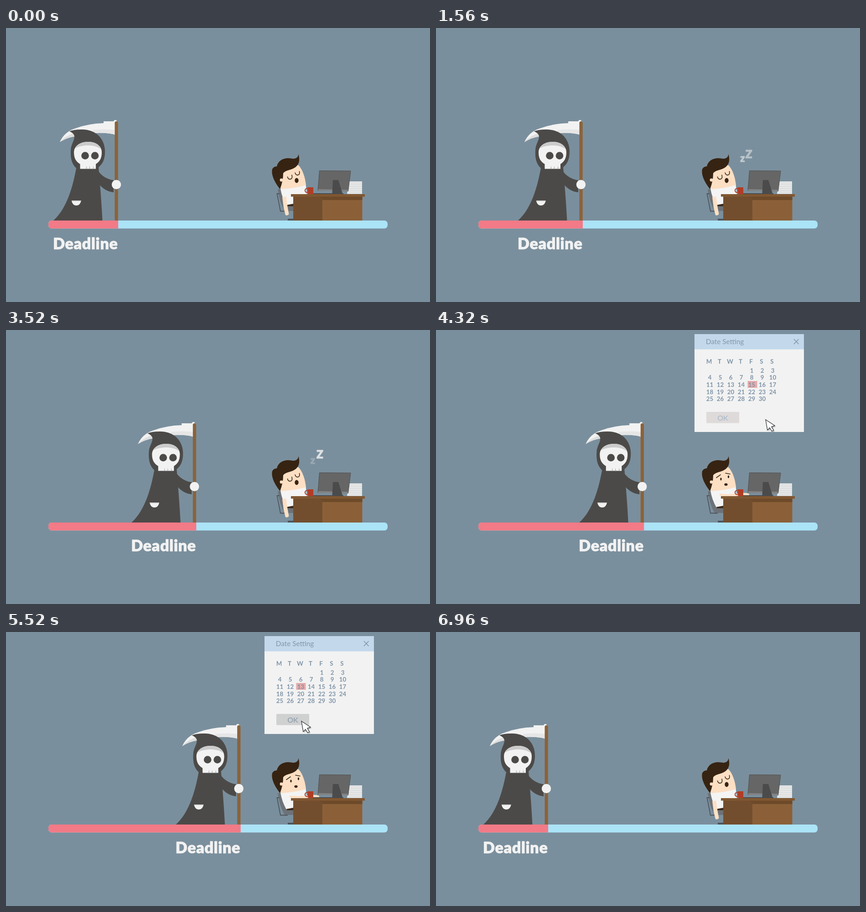
An HTML page that plays this animation: 930x602 px, repeating every 7000 ms.

```html
<!DOCTYPE html>
<html lang="en">
<head>
<meta charset="utf-8">
<title>Deadline</title>
<style>
html, body { margin: 0; width: 100%; height: 100%; overflow: hidden; background: #7a8f9d; }
svg { display: block; width: 930px; height: 602px; }
text { font-family: Lato, "Open Sans", sans-serif; text-anchor: middle; }
.line { fill: none; stroke: #3a2716; stroke-width: 1.6; stroke-linecap: round; }
.bold { font-weight: 900; fill: #f2f2f2; stroke: #f2f2f2; stroke-width: .9; stroke-linejoin: round; }
</style>
</head>
<body>
<svg viewBox="0 0 930 602">
  <rect width="930" height="602" fill="#7a8f9d"/>
  <clipPath id="track"><rect x="93" y="423" width="744" height="17.5" rx="7"/></clipPath>
  <g clip-path="url(#track)">
    <rect x="93" y="423" width="744" height="18" fill="#abe3f7"/>
    <rect id="red" x="93" y="423" width="153" height="18" fill="#f37a87"/>
  </g>

  <g id="reaper">
    <path fill="#f2f2f2" d="M118 250.500Q128 228 152 220.500Q180 210 214 209V205H236Q237 202 240 202T243 206V235Q225 229 190 231L150 238Q134 240 118 250.500Z"/>
    <path fill="#dedede" d="M118 250.500Q131 236 150 231V238.500Q134 241 118 250.500Z"/>
    <path fill="#e6e6e6" d="M190 224Q215 221 240 224V235Q225 229 190 231Z"/>
    <path fill="#4c4a48" d="M139 227Q150 222.500 168 223C200 224 217 245 217 272C217 290 211 299 203 306C206 340 210 390 211.500 423H104C135 395 147 345 154 308C146 300 141 290 142 270C142 255 150 249 150 238Q149 231 139 227Z"/>
    <path fill="#4c4a48" d="M202 314Q214 331 236 334.500V361Q217 359 204 343Z"/>
    <path fill="#f2f2f2" d="M149 273C149 259 163 250 180 250S210 259 210 273C210 286 206 293 197 299V309.500H162.500V299C153 293 149 286 149 273Z"/>
    <path fill="#cbcbcb" d="M151 265C156 255 166 250 180 250S204 255 208.500 266C200 260 190 258 180 258S158 260 151 265Z"/>
    <circle cx="173.500" cy="280.500" r="8.300" fill="#4c4a48"/>
    <circle cx="195" cy="280.500" r="8.300" fill="#4c4a48"/>
    <path fill="#bdbdbd" d="M175 309.500L176.500 303 178 309.500ZM182 309.500L183.500 303 185 309.500ZM190 309.500L191.500 303 193 309.500Z"/>
    <path fill="#f2f2f2" d="M144 379H164.500A10.250 11 0 0 1 144 379Z"/>
    <path fill="#d5d5d5" d="M144 379H164.500V381H144Z"/>
    <path fill="#8c6239" d="M238.500 423V208.500Q238.500 205 242 205T245.700 208.500V423Z"/>
    <circle cx="242" cy="344" r="10.200" fill="#f2f2f2"/>
    <text class="bold" x="174.300" y="486" font-size="34" letter-spacing=".7">Deadline</text>
  </g>

  <g id="worker">
    <path fill="#6d7278" d="M596 354H603L617 391H630V402H611Q600 382 596 354Z"/>
    <path fill="none" stroke="#4c555d" stroke-width="1.800" d="M600 364H594.500L602 402.500H618"/>
    <path fill="#4c555d" d="M618 419H631V423H618Z"/>
    <path fill="#f4f4f4" d="M602 353Q632 352 657.500 344L660 366H630V387L615 390Q605 372 602 353Z"/>
    <path fill="#3a2716" d="M615 389L631 386V391.500H616Z"/>
    <path fill="#fddfc3" d="M602 354L605 324C610 300 630 296 642 302C651 312 656 328 658 345Q632 353 602 354Z"/>
    <path fill="#362312" d="M601 354C590 340 581 323 584 310Q587 304 594 304C597 290 611 284 625 286.500C636 289 641 284 641.500 277C645 290 643 299 636 305C628 312 613 312 608 319Q608 336 601 354Z"/>
    <circle cx="604" cy="334" r="3.400" fill="#fddfc3"/>
    <g id="asleep">
      <path class="line" d="M617.500 327Q619 333 624 332T627 323M634 318Q636 324 640.500 323T643.500 315"/>
      <ellipse cx="637.500" cy="335" rx="4.200" ry="5.400" fill="#362312"/>
    </g>
    <g id="awake">
      <path class="line" d="M615 324.500L624 318M635 314.500L645 316.500"/>
      <ellipse cx="625" cy="327.500" rx="1.700" ry="2.900" fill="#362312"/>
      <ellipse cx="641.500" cy="322.500" rx="1.700" ry="2.900" fill="#362312"/>
      <ellipse cx="636" cy="339.500" rx="3.600" ry="2.700" fill="#362312"/>
    </g>
    <path id="armDown" fill="#fddfc3" d="M606 372L614.500 370 617 390 620.500 409Q617 413 613 411L609 395Z"/>
    <path id="armUp" fill="#fddfc3" d="M622 359.500Q640 362 662 359Q679 356 687 360V364.500H625Q621 363 622 359.500Z"/>
  </g>

  <g id="desk">
    <path fill="#e9e9e9" d="M753 337H781V364.500H748Z"/>
    <path stroke="#cdd0d2" d="M753 340.500H781M753 344.500H781M753 348.500H781M753 352.500H781M753 356.500H781M753 360.500H781"/>
    <path fill="#666" d="M687.500 313.500L756 314 750.500 359 684 357.500Z"/>
    <path fill="#848484" d="M684.400 354L751 355.500 750.500 359 684 357.500Z"/>
    <path fill="none" stroke="#505050" d="M684 357.500L687.500 313.500 756 314 750.500 359"/>
    <path fill="#4b4b4b" d="M717 334H729L738 363H740V365H674V363H715.500Z"/>
    <circle cx="660.500" cy="357" r="4.500" fill="none" stroke="#b03d26" stroke-width="2.200"/>
    <path fill="#b03d26" d="M661.500 350H674V365H663Q661.500 361 661.500 350Z"/>
    <path fill="#734e2e" d="M630 368H694V423H630Z"/>
    <path fill="#8b6038" d="M694 368H781.500V423H694Z"/>
    <path fill="#6e4a2a" d="M689 370H781.500V378H694V374H689Z"/>
    <path fill="#805731" d="M625 365H787V370.500H625Z"/>
  </g>

  <text id="smallZ" class="bold" x="672" y="295" font-size="22">z</text>
  <text id="bigZ" class="bold" x="685" y="287.500" font-size="24.500">Z</text>

  <g id="dialog">
    <path fill="#f2f2f2" d="M567 9H807V224H567Z"/>
    <path fill="#c3d8eb" d="M567 9H807V42.500H567Z"/>
    <text x="633.500" y="31" font-size="15.300" fill="#8196aa">Date Setting</text>
    <path stroke="#8196aa" stroke-width="1.600" d="M785 20L795.500 31M795.500 20L785 31"/>
    <rect id="mark" y="112" width="21" height="15" fill="#e6aaaa"/>
    <g id="days" font-size="13.300" font-weight="700" fill="#7e93a7"></g>
    <rect id="button" x="593" y="180" width="72" height="24.500" rx="1.500"/>
    <text id="ok" x="629" y="198.500" font-size="16">OK</text>
    <g id="cursor">
      <path fill="#000" opacity=".22" transform="translate(2.500 2.500)" d="M0 0L4 23 9 18 13.500 25.500 17.500 23 13 15.500 20 13Z"/>
      <path fill="#fff" stroke="#3d4145" stroke-width="1.400" d="M0 0L4 23 9 18 13.500 25.500 17.500 23 13 15.500 20 13Z"/>
    </g>
  </g>
</svg>
<script>
const LOOP = 7000, SPEED = 0.04866, TURN = 5887, BACK = 6962;
const $ = id => document.getElementById(id);
const set = (id, attrs) => { for (const k in attrs) $(id).setAttribute(k, attrs[k]); };
const show = (id, on) => set(id, { opacity: +on });
const clamp = v => Math.max(0, Math.min(1, v));
const part = (t, a, b) => clamp((t - a) / (b - a));
const smooth = p => p * p * (3 - 2 * p);
const mix = (a, b, p) => a + (b - a) * p;

// Calendar whose first day falls on the fifth column
let cells = "";
const cell = (x, y, s) => cells += `<text x="${x}" y="${y}">${s}</text>`;
[..."MTWTFSS"].forEach((s, c) => cell(599 + 23 * c, 74, s));
for (let d = 1; d <= 30; d++) {
  const i = d + 3;
  cell(600.5 + 23 * (i % 7), 93.5 + 15.7 * Math.floor(i / 7), d);
}
$("days").innerHTML = cells;

// Slow steady walk, then a quick return with short soft ends
function walk(t) {
  if (t < TURN) return t * SPEED;
  const span = BACK - TURN, ramp = 171, s = Math.min(t - TURN, span);
  const ease = u => u * u / (2 * ramp);
  const run = s < ramp ? ease(s)
    : s < span - ramp ? s - ramp / 2
    : span - ramp - ease(span - s);
  return TURN * SPEED * (1 - run / (span - ramp));
}

function snore(id, t, start, strength, drift) {
  const u = (t - start) / 830 % 1;
  const on = t > start && t < 3640;
  set(id, {
    opacity: on ? strength * Math.sin(Math.PI * u) : 0,
    transform: `translate(${drift * u} ${-drift * 1.5 * u})`
  });
}

function drawDialog(t) {
  set("dialog", { opacity: part(t, 3840, 4000) * (1 - part(t, 5740, 5880)) });
  const toDay = smooth(part(t, 4320, 4840)), toOk = smooth(part(t, 5000, 5440));
  const x = mix(723, 648, toDay);
  const y = mix(mix(197, 121, toDay), 196, toOk);
  set("cursor", { transform: `translate(${x} ${y})` });
  set("mark", { x: t < 4900 ? 683.5 : 636.5 });
  const hover = toOk > 0.85;
  set("button", { fill: hover ? "#cfd0d0" : "#dfdada" });
  set("ok", { fill: hover ? "#8799a9" : "#a3b7c8" });
}

function draw(now) {
  const t = now % LOOP, dx = walk(t);
  set("reaper", { transform: `translate(${dx} 0)` });
  set("red", { width: 153 + dx });
  const awake = t >= 3680 && t < 6720, typing = t >= 3800 && t < 5960;
  show("awake", awake);
  show("asleep", !awake);
  show("armUp", typing);
  show("armDown", !typing);
  snore("smallZ", t, 315, 0.6, 1);
  snore("bigZ", t, 564, 0.85, 6);
  drawDialog(t);
}

const begin = performance.now();
function tick() {
  draw(performance.now() - begin);
  requestAnimationFrame(tick);
}
tick();
</script>
</body>
</html>
```
